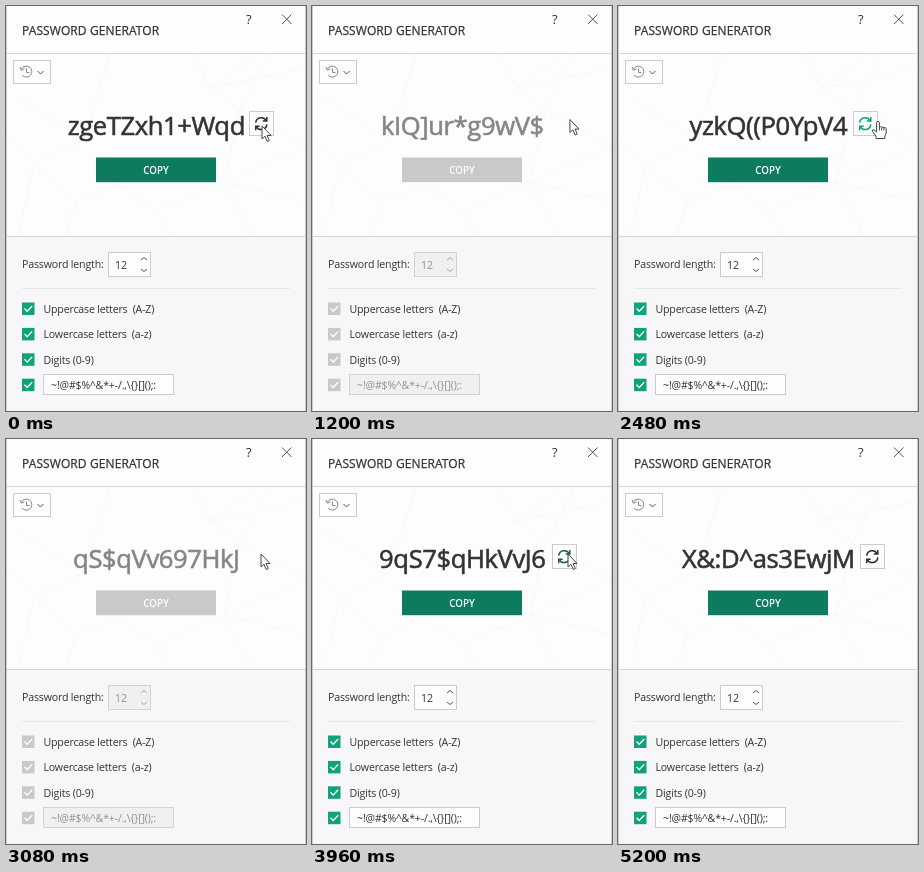
Write an HTML page that moves like this. It is 300 by 405 pixels and loops after 5.24 s.

```html
<!DOCTYPE html>
<html lang="en">
<head>
<meta charset="utf-8">
<title>Password generator</title>
<style>
html, body { margin: 0; width: 100%; height: 100%; overflow: hidden; background: #f7f6f9; }
svg { display: block; width: 300px; height: 405px; font-family: "Open Sans", "Noto Sans", sans-serif; }
text { white-space: pre; fill: #333; }
.body { font-size: 10.6px; letter-spacing: -.17px; }
.line { fill: none; stroke: #555; }
.pale { stroke: #888; }
.box { fill: #fefdfe; stroke: #cbcacd; }
.check { fill: #10a37b; }
.copy { fill: #0c7b5e; }
#title { font-size: 12px; letter-spacing: .1px; stroke: #333; stroke-width: .25px; }
#password { font-size: 25.6px; letter-spacing: -.4px; text-anchor: middle; stroke: #333; stroke-width: .6px; }
.busy .check, .busy .copy { fill: #c9c9c9; }
.busy .field { fill: #f0eff1; stroke: #d3d3d5; }
.busy .value { fill: #929292; }
.busy .spin { stroke: #aaa; }
.busy #password { fill: #858585; stroke: #858585; }
.busy #refresh { display: none; }
.cursor { fill: #fff; stroke: #444; stroke-linejoin: round; }
</style>
</head>
<body>
<svg id="stage" viewBox="0 0 300 405">
  <rect width="300" height="405" fill="#f7f6f9"/>
  <rect width="300" height="230" fill="#fefdfe"/>
  <path d="M0 47.5H300" stroke="#d4d3d6"/>
  <path fill="none" stroke="#f8f7f9" d="M0 128L28 158L12 231M28 158L78 134L104 48M28 158L70 196L112 178M70 196L58 231M78 134L12 92M186 48L204 82L252 48M204 82L300 62M204 82L234 104L300 140M234 104L262 48M234 104L218 176L300 140M218 176L246 231M218 176L150 205L112 178M150 205L166 231M300 196L218 176"/>
  <path d="M0 230.5H300" stroke="#d4d3d6"/>
  <path d="M.5 0V405M299.5 0V405" stroke="#cbcacd"/>

  <text id="title" x="16" y="29">PASSWORD GENERATOR</text>
  <text x="240" y="18" font-size="13">?</text>
  <path class="line" d="M276 8.5L285.5 18M285.5 8.5L276 18"/>

  <rect class="box" x="7.5" y="54.5" width="37" height="23"/>
  <path class="line pale" d="M15.5 63A5.5 5.5 0 1 1 16 69M14 61L15.3 64.2L18.5 63M20.5 62.5V66.5H23.5"/>
  <path class="line" d="M31.5 65L34.5 68L37.5 65"/>

  <text id="password" x="150.3" y="129"></text>
  <g id="refresh">
    <rect class="box" x=".5" y="105.5" width="24" height="24"/>
    <path id="arrows" fill="none" stroke-width="1.5" d="M6.7 116.8A5.6 5.6 0 0 1 17.2 114.6M17.8 111V115H13.8M17.8 118.4A5.6 5.6 0 0 1 7.3 120.6M6.7 124.2V120.2H10.7"/>
  </g>

  <rect class="copy" x="90" y="151.5" width="120" height="24.7"/>
  <text x="150" y="168" font-size="9.8" font-weight="600" text-anchor="middle" style="fill:#fff">COPY</text>

  <text class="body" x="16" y="262">Password length:</text>
  <rect class="box field" x="102.5" y="246.5" width="42" height="24"/>
  <text class="body value" x="109" y="262.5">12</text>
  <path class="line spin" d="M135 254L138 251.5L141 254M135 263L138 265.5L141 263"/>
  <path d="M16 282.5H284" stroke="#e6e5e8"/>

  <g id="options"></g>
  <rect class="box field" x="37.5" y="368.5" width="130" height="20"/>
  <text class="body value" x="45" y="383">~!@#$%^&amp;*+-/.,\{}[]();:</text>

  <g id="cursor">
    <path id="arrow" class="cursor" d="M0 0V13L3 10.3L5.2 15.5L7.3 14.5L5.1 9.5H9Z"/>
    <path id="hand" class="cursor" d="M-1.4 1.2Q0 -.8 1.4 1.2V6Q2.7 5 3.7 6.4Q5 5.3 6 6.8Q7.6 6 8.2 7.6V12L6.8 15V17.5H-2V15L-5.6 10.5Q-6 8.4 -4 8.8L-1.4 11ZM1.4 6V9.5M3.7 6.4V9.5M6 6.8V9.5"/>
  </g>
</svg>
<script>
const LOOP = 5240, STEP = 80;
const $ = id => document.getElementById(id);

// Each run shuffles its characters from start to end, then settles.
const runs = [
  { start: -800, end: 0, mix: "Wz1gxTd+hZqe", text: "zgeTZxh1+Wqd", x: 243 },
  { start: 760, end: 1680, mix: "k]V9Qg*u$rIw", text: "Qr9I]*kwuV$g", x: 236 },
  { start: 1840, end: 2240, mix: "P(4zQ0yVk(pY", text: "yzkQ((P0YpV4", x: 235 },
  { start: 3040, end: 3880, mix: "qS$qVv697HkJ", text: "9qS7$qHkVvJ6", x: 240 },
  { start: 4120, end: 4920, mix: "a:MX3^wDj&sE", text: "X&:D^as3EwjM", x: 242 }
];

// Pointer path: time, x, y
const path = [
  [0, 256, 120], [160, 256, 120], [520, 251, 112], [760, 251, 112],
  [1400, 260, 114], [2480, 260, 115], [2900, 255, 115], [3080, 255, 115],
  [3960, 256, 115], [4240, 256, 115], [4920, 304, -20], [LOOP, 304, -20]
];
const handTimes = [[200, 760], [1720, 1840], [2280, 3040], [4000, 4120]];

$("options").innerHTML = ["Uppercase letters  (A-Z)", "Lowercase letters  (a-z)", "Digits (0-9)", ""]
  .map((label, i) => {
    const y = 296.5 + i * 25.4;
    return `<rect class="check" x="16" y="${y}" width="12.5" height="12.5"/>
      <path d="M18.5 ${y + 6}l2.7 2.8l5 -5.3" fill="none" stroke="#fff" stroke-width="1.3"/>
      <text class="body" x="37.5" y="${y + 10.5}">${label}</text>`;
  }).join("");

function shuffle(text, seed) {
  const chars = [...text];
  for (let i = chars.length - 1; i > 0; i--) {
    seed = (seed * 16807) % 2147483647;
    const j = seed % (i + 1);
    [chars[i], chars[j]] = [chars[j], chars[i]];
  }
  return chars.join("");
}

function pointerAt(t) {
  const i = path.findIndex(p => p[0] > t);
  const [t0, x0, y0] = path[i - 1], [t1, x1, y1] = path[i];
  const p = (t - t0) / (t1 - t0), e = p * p * (3 - 2 * p);
  return [x0 + (x1 - x0) * e, y0 + (y1 - y0) * e];
}

function hoverColor(p) {
  const mix = (a, b) => Math.round(a + (b - a) * p);
  return `rgb(${mix(45, 16)},${mix(45, 163)},${mix(45, 123)})`;
}

function draw(t) {
  const run = runs.filter(r => r.start <= t).pop();
  const busy = t < run.end;
  const step = Math.floor((t - run.start) / STEP);
  $("stage").classList.toggle("busy", busy);
  $("password").textContent = !busy ? run.text : step ? shuffle(run.mix, step * 7919 + 13) : run.mix;
  $("refresh").setAttribute("transform", `translate(${run.x})`);

  const [x, y] = pointerAt(t);
  const hovered = x < run.x + 25 && y > 105;
  const fade = hovered ? Math.min(1, Math.max(0, (t - run.end) / 200)) : 0;
  $("arrows").setAttribute("stroke", hoverColor(fade));

  const hand = handTimes.some(([from, to]) => t >= from && t < to);
  $("cursor").setAttribute("transform", `translate(${x} ${y})`);
  $("hand").style.display = hand ? "" : "none";
  $("arrow").style.display = hand ? "none" : "";
}

const began = performance.now();
function tick() {
  draw((performance.now() - began) % LOOP);
  requestAnimationFrame(tick);
}
tick();
</script>
</body>
</html>
```
